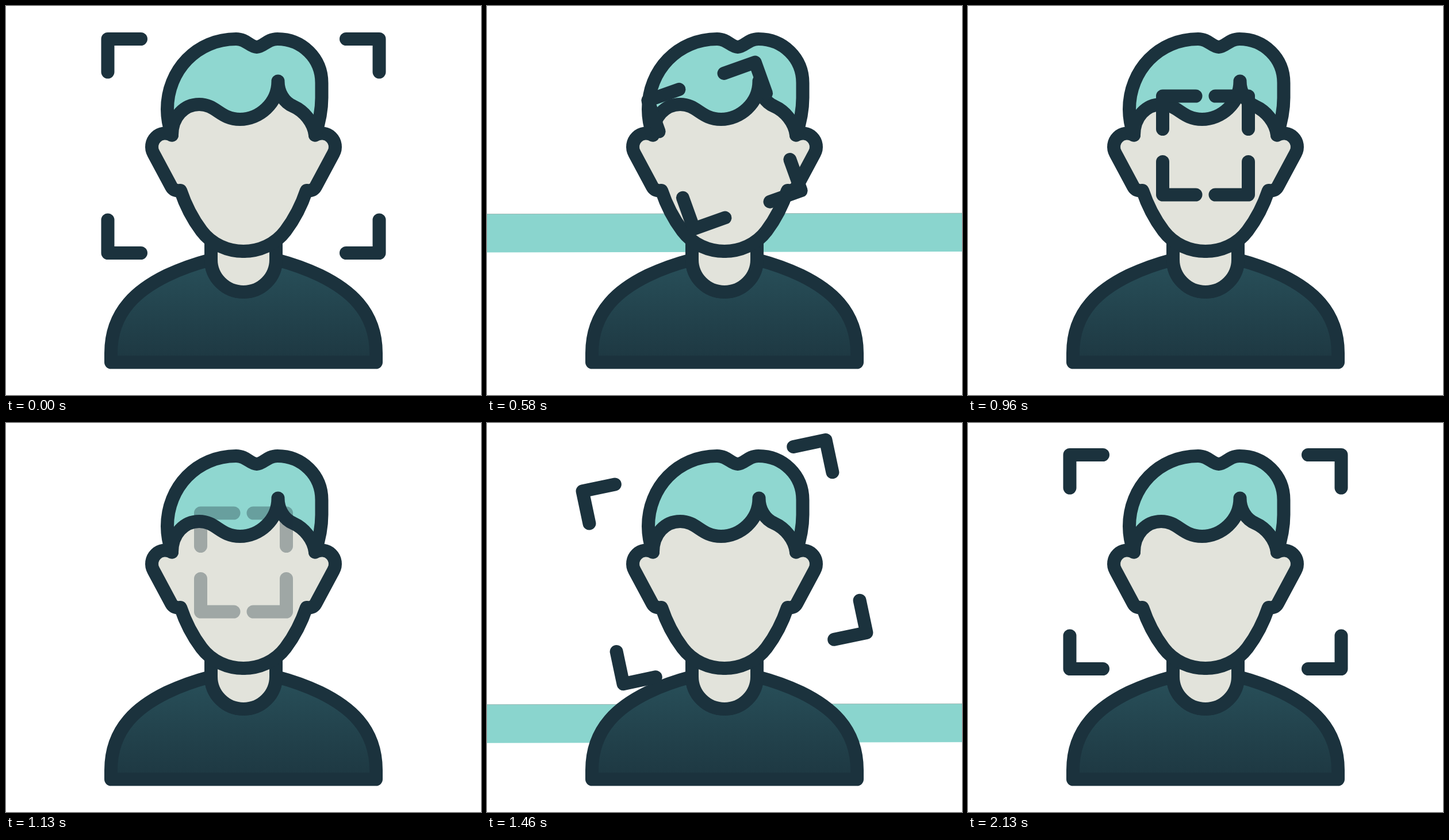
An HTML page with a canvas that plays this animation: 826 by 678 pixels, repeating every 4000 ms.

```html
<!DOCTYPE html>
<html lang="en">
<head>
<meta charset="utf-8">
<title>Face scan</title>
<style>
  html, body { margin: 0; width: 100%; height: 100%; overflow: hidden; background: #fff; }
  canvas { display: block; }
</style>
</head>
<body>
<canvas id="stage" width="826" height="678"></canvas>
<script>
const W = 826, H = 678, CX = 413, CY = 244;
const LOOP = 4000, FPS = 24;
const FIRST_PASS = 10, SECOND_PASS = 30;
const INK = '#1b323d', SKIN = '#e2e3db', HAIR = '#8fd7d0', BAR = '#8ad5ce';

const ctx = document.getElementById('stage').getContext('2d');

const body = new Path2D(
  'M356.5 442 C330 449 302 459 280 469.5 C232 493 182.5 530 182.5 605 V621 H643.5 V605' +
  'C643.5 530 594 493 546 469.5 C524 459 496 449 469.5 442 A56.5 56.5 0 0 1 356.5 442 Z');
const neck = new Path2D('M356.5 410 V442 A56.5 56.5 0 0 0 469.5 442 V410');

const earAndJaw =
  'A23.5 23.5 0 0 0 256.5 257 L287.5 315 Q292 323 303.5 321.5' +
  'C313 350 325 372 340 392 C358 416 386 427.5 413 427.5';
const halfFaceLine = new Path2D('M288.5 225' + earAndJaw);
const halfFaceFill = new Path2D('M414 150 H300 L288.5 225' + earAndJaw + 'H414 Z');

const hair = new Path2D(
  'M288.5 225 C284 212 280.5 195 280.5 180 C280.5 112 332 57.5 400 57.5' +
  'C418 57.5 424 71 436 71.5 C448 71 454 57.5 472 57.5' +
  'C515 57.5 549 91 549 134 V160 C549 185 544 205 537.5 225' +
  'C535 203 518 183 500 175 C483 168 473 150 473 131' +
  'C473 170 440 197.5 407 197.5 C372 197.5 366 171.5 336 171.5' +
  'C310 171.5 288.5 193 288.5 225 Z');

const shirt = ctx.createLinearGradient(0, 445, 0, 610);
shirt.addColorStop(0, '#284f59');
shirt.addColorStop(1, '#1e3943');

const clamp = x => Math.min(1, Math.max(0, x));
const smooth = x => x * x * (3 - 2 * x);
const easeOut = (step, length, power) => 1 - (1 - clamp(step / length)) ** power;
const turn = step => easeOut(step, 12, 3.75);

// Opacity drop that lasts seven steps
const dip = step => 0.7 * smooth(clamp(1 - Math.abs(step - 3.5) / 3.5));

function paint(path, fill) {
  ctx.fillStyle = fill;
  ctx.fill(path);
  ctx.stroke(path);
}

function mirrored(draw) {
  draw();
  ctx.save();
  ctx.translate(W, 0);
  ctx.scale(-1, 1);
  draw();
  ctx.restore();
}

function drawBar(step) {
  if (step <= 0) return;
  const top = -835 + 1565 * easeOut(step, 17.7, 5.65);
  const left = top + 0.7, right = top - 0.8, height = 67;
  ctx.fillStyle = BAR;
  ctx.beginPath();
  ctx.moveTo(0, left);
  ctx.lineTo(W, right);
  ctx.lineTo(W, right + height);
  ctx.lineTo(0, left + height);
  ctx.fill();
  ctx.strokeStyle = '#9db8b4';
  ctx.lineWidth = 1;
  ctx.beginPath();
  ctx.moveTo(0, left);
  ctx.lineTo(W, right);
  ctx.stroke();
}

function drawPerson() {
  paint(body, shirt);
  paint(neck, SKIN);
  mirrored(() => {
    ctx.fillStyle = SKIN;
    ctx.fill(halfFaceFill);
  });
  mirrored(() => ctx.stroke(halfFaceLine));
  paint(hair, HAIR);
}

function drawBrackets(step) {
  const first = turn(step - FIRST_PASS), second = turn(step - SECOND_PASS);
  const closed = first - second, turned = first + second;
  const x = 236 - 150 * closed, y = 186.5 - 112 * closed, arm = 57.5;
  ctx.save();
  ctx.globalAlpha = 1 - dip(step - 24) - dip(step - 44);
  ctx.translate(CX, CY - turned);
  ctx.rotate(Math.PI / 2 * turned);
  ctx.beginPath();
  for (const sx of [-1, 1]) {
    for (const sy of [-1, 1]) {
      ctx.moveTo(sx * (x - arm), sy * y);
      ctx.lineTo(sx * x, sy * y);
      ctx.lineTo(sx * x, sy * (y - arm));
    }
  }
  ctx.stroke();
  ctx.restore();
}

function render() {
  const time = performance.now() % LOOP;
  const step = Math.floor(time * FPS / 1000 + 0.1);
  ctx.fillStyle = '#fff';
  ctx.fillRect(0, 0, W, H);
  drawBar(step - (step > SECOND_PASS ? SECOND_PASS : FIRST_PASS));
  ctx.strokeStyle = INK;
  ctx.lineWidth = 23;
  ctx.lineCap = ctx.lineJoin = 'round';
  drawPerson();
  drawBrackets(step);
  requestAnimationFrame(render);
}
render();
</script>
</body>
</html>
```
